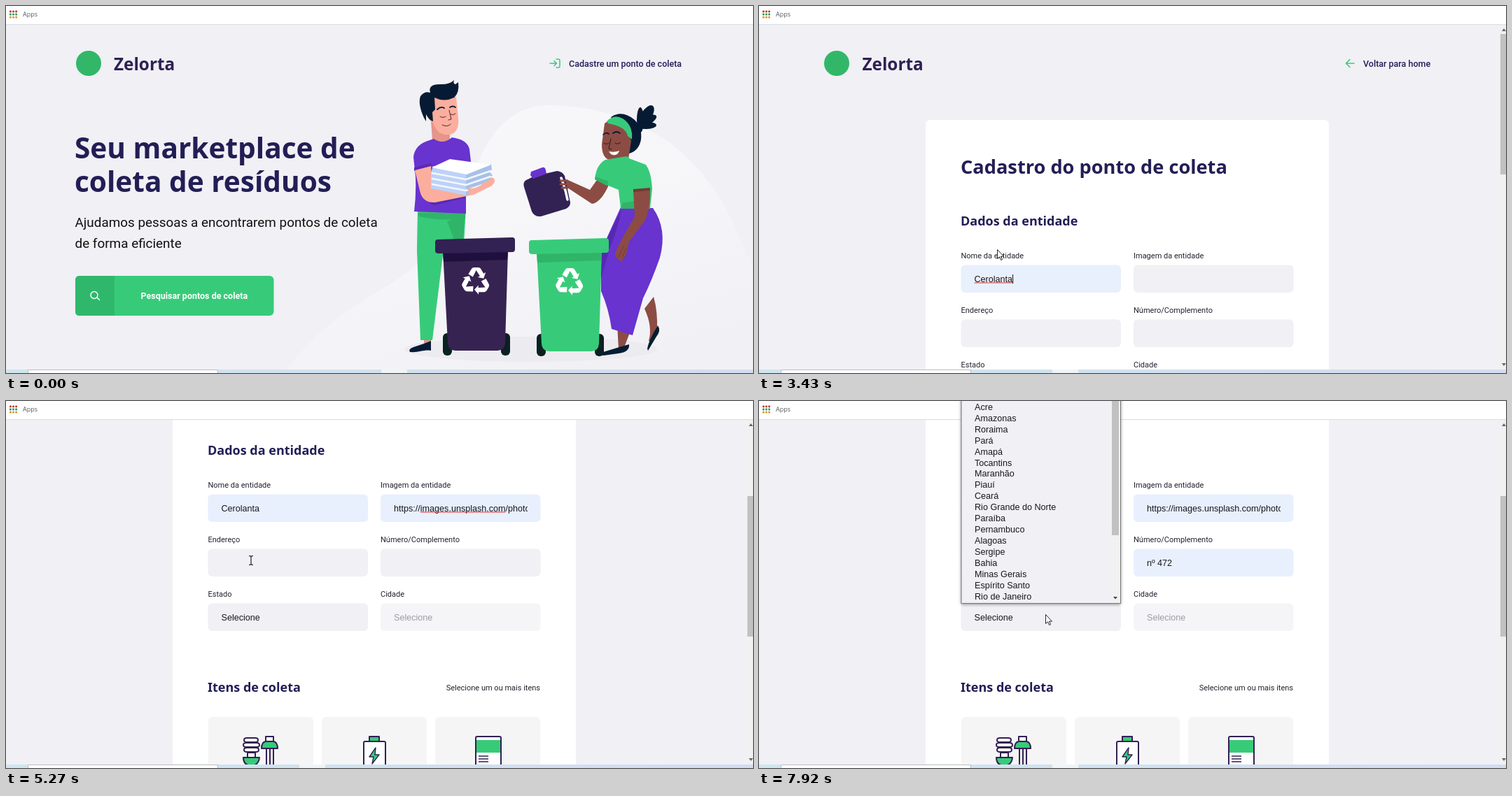
Animation, 1067 px wide and 525 px high, one loop 7.99 s. Source, as an HTML page:

```html
<!DOCTYPE html>
<html lang="pt-BR">
<head>
<meta charset="utf-8">
<title>Ponto de coleta</title>
<style>
html, body { margin: 0; width: 100%; height: 100%; overflow: hidden; background: #f0f0f5; }
svg { display: block; width: 1067px; height: 525px; font: 11px Roboto, sans-serif; fill: #24222f; }
.title { font-family: "Noto Sans", sans-serif; font-weight: 700; fill: #221e55; }
.brand { font-size: 24.3px; fill: #2f2152; }
.link { font-size: 12.5px; font-weight: 500; fill: #221e55; }
.input { font: 12.6px "Liberation Sans", Arial, sans-serif; fill: #17171c; }
.ui { font: 10.1px "Open Sans", sans-serif; fill: #111; }
.small { font-size: 9px; fill: #555a60; }
.muted { fill: #9b9ba6; }
.popup { filter: drop-shadow(0 1px 2px rgba(0, 0, 0, .4)); }
.line { fill: none; stroke-linecap: round; stroke-linejoin: round; }
</style>
</head>
<body>
<svg viewBox="0 0 1067 525">
  <defs>
    <clipPath id="view"><path d="M0 27H1067V520H0Z"/></clipPath>
    <clipPath id="urlBox"><path d="M554 371H745V410H554Z"/></clipPath>
    <linearGradient id="mist" x1=".3" y1="0" x2=".8" y2="1">
      <stop offset="0" stop-color="#f8f8fb"/><stop offset=".45" stop-color="#f6f6f9"/><stop offset="1" stop-color="#f0f0f5"/>
    </linearGradient>
    <linearGradient id="strip"><stop offset="0" stop-color="#cfe6ef"/><stop offset="1" stop-color="#d3dcf0"/></linearGradient>
    <path id="arm" d="M-9-9-5-15.5Q-4-17-2-17H3Q5-17 6-15.5L9.5-9.5 12-11 9.5-3.5 2.5-5 5-6.5 .5-13.5-3.5-5.5Z"/>
    <g id="recycle" fill="#fff"><use href="#arm"/><use href="#arm" transform="rotate(120)"/><use href="#arm" transform="rotate(240)"/></g>
  </defs>
  <rect width="1067" height="525" fill="#f0f0f5"/>

  <g clip-path="url(#view)">
    <g id="home">
      <path fill="url(#mist)" d="M399 522C435 472 485 436 535 406C600 370 640 320 665 250C686 180 724 142 775 142C850 143 905 165 950 197C1005 238 1032 295 1050 336L1069 378V522Z"/>
      <ellipse cx="750" cy="491" rx="181" ry="18" fill="#ebebf0"/>
      <circle cx="118" cy="82" r="18" fill="#32b768"/>
      <text class="title brand" x="154" y="91.5">Zelorta</text>
      <path class="line" stroke="#37cb79" stroke-width="1.5" d="M786 76h3q2 0 2 2v8q0 2-2 2h-3M777 82h9M783 78.500l3.500 3.500-3.500 3.500"/>
      <text class="link" x="804" y="86.5">Cadastre um ponto de coleta</text>
      <g class="title" font-size="40.6"><text x="98" y="218">Seu marketplace de</text><text x="98" y="266">coleta de resíduos</text></g>
      <g font-size="18.9" fill="#111"><text x="98.500" y="316">Ajudamos pessoas a encontrarem pontos de coleta</text><text x="98.500" y="346">de forma eficiente</text></g>
      <rect x="99" y="386" width="283.500" height="57" rx="6" fill="#37cb79"/>
      <path fill="#2fb86c" d="M155 386V443H105Q99 443 99 437V392Q99 386 105 386Z"/>
      <path class="line" stroke="#fff" stroke-width="1.4" d="M121 413.500a5 5 0 1 0 10 0a5 5 0 1 0-10 0M130 417l3.500 3.500"/>
      <text x="192.500" y="418.700" font-size="12.5" font-weight="700" fill="#fff">Pesquisar pontos de coleta</text>

      <!-- man -->
      <path fill="#e5958a" d="M597 472H607V483H597ZM607 165L634 170V192Q622 201 609 192Z"/>
      <path fill="#071c33" d="M607 479V493C598 491 590 496 577 495Q574 491 582 488L597 483Z"/>
      <path fill="#37cb79" d="M588 290H657L654 340H626L609 478H592L587 350Z"/>
      <path fill="#2fb468" d="M589 296H656V304Q620 308 589 301ZM630 308L655 300 653 334H640Z"/>
      <path fill="#6833cf" d="M582 216Q584 198 605 192L611 190Q624 199 637 188Q659 191 662 205L664 222 657 245V297L583 294Q586 270 585 245Z"/>
      <path fill="#5729b2" d="M604 282L657 268V274L612 285ZM583 231L607 225 608 229 583 236Z"/>
      <path fill="#fbae9d" d="M604 132Q625 122 643 130L646 160Q648 181 634 184Q616 186 610 167Q602 164 603 153Z"/>
      <path fill="#061b33" d="M600 165L597 160Q588 140 592 129Q598 121 606 124Q602 111 622 112Q634 112 640 106Q638 111 642 112L646 109Q648 124 640 131Q626 138 612 131L613 148 609 152 610 165Q604 163 600 155Z"/>
      <path class="line" stroke="#4a2630" d="M620 158q4 3 8 0M635 155q4 2 7-1M633 149l3 13-4 1M623 170q7 4 12-1"/>
      <path class="line" stroke="#061b33" stroke-width="1.8" d="M616 148q5-5 10-2M634 145q4-3 8 0"/>
      <path fill="#fbae9d" d="M584 235L607 229 609 255Q625 258 672 260L688 247Q697 243 698 250Q697 257 688 260L668 270 613 281Q597 282 592 268Z"/>
      <path fill="#bdd2f7" d="M607 238L610 229 658 240V271L607 261Z"/>
      <path fill="#a8c0e8" d="M657 241L693 226 694 234 691 238 695 242 691 247 694 251 657 271Z"/>
      <path fill="#fff" d="M608 231L634 219 693 227 658 241Z"/>
      <path class="line" stroke="#f3f7ff" stroke-width="2.500" d="M609 239L657 248 692 236M609 247L657 256 692 244M609 255L657 264 692 252"/>
      <path fill="#fbae9d" d="M659 261Q674 262 682 253L696 246Q701 251 691 257Q678 267 662 269Z"/>

      <!-- woman -->
      <path fill="#8c4c44" d="M873 455L893 462 882 491H875ZM912 433L925 416Q931 436 930 464L922 482 918 479Q924 459 912 433Z"/>
      <path fill="#071c33" d="M876 488L890 484Q891 495 875 497L853 500Q849 498 853 495ZM916 490Q918 478 931 457Q936 464 929 473L917 493Z"/>
      <path fill="#6833cf" d="M878 288L924 289Q945 319 934 360Q922 394 910 418L895 471 865 462Q861 433 850 408V350Z"/>
      <path fill="#5729b2" d="M879 291Q873 322 862 347L850 390V350Z"/>
      <path fill="#8c4c44" d="M846 246L861 256Q850 281 837 283L802 260Q793 262 792 252Q796 245 805 250L834 263Z"/>
      <path fill="#061b33" d="M864 159Q880 148 898 163Q909 174 907 191Q904 209 886 212L878 180Z"/>
      <g fill="#061b33"><ellipse cx="906" cy="163" rx="5" ry="18"/><ellipse cx="914" cy="158" rx="8" ry="18" transform="rotate(32 914 158)"/><ellipse cx="915" cy="165" rx="6" ry="16" transform="rotate(60 915 165)"/><ellipse cx="915" cy="171" rx="5" ry="14" transform="rotate(88 915 171)"/></g>
      <path fill="#8c4c44" d="M855 168Q868 158 882 168L893 193 889 219Q874 224 861 220Q851 216 851 198Z"/>
      <path fill="#37cb79" d="M858 165Q868 154 881 161Q896 171 894 191L888 186Q885 172 860 168Z"/>
      <path class="line" stroke="#2c1822" d="M854 196q4 3 7 0M870 196q4 3 8-1M864 190l-3 14 4 1"/>
      <path class="line" stroke="#061b33" stroke-width="1.7" d="M853 184q4-4 8-1M867 182q5-4 10 0"/>
      <path fill="#fff" d="M861 208Q869 210 876 207Q873 216 864 212Z"/>
      <path fill="#37cb79" d="M856 220L880 216Q891 214 890 218L914 227Q922 238 923 262L920 290H878L875 263 858 256 841 248Q843 227 856 220Z"/>
      <path fill="#2fb468" d="M881 281Q902 281 918 266L920 290H878ZM842 244L861 251 858 257 841 248Z"/>
      <path fill="#8c4c44" d="M896 264L920 262Q921 291 912 308L890 337 886 355 879 366 871 359 870 353 881 331 898 301Z"/>
      <path fill="#733a36" d="M896 262L920 260V264L896 266Z"/>
      <path class="line" stroke="#733a36" d="M882 344l-7 15M886 346l-6 14"/>

      <!-- jug -->
      <path fill="#322153" d="M743 249Q751 245 756 243L787 236Q795 237 798 243L806 281Q806 287 800 290L764 301Q755 302 751 294L740 259Q738 252 743 249Z"/>
      <path fill="#6833cf" d="M750 237L766 231Q770 230 771 235L772 240 753 247 749 242Z"/>
      <path class="line" stroke="#fff" stroke-width="3.500" d="M793 246Q799 261 802 277"/>
      <path class="line" stroke="#8c4c44" stroke-width="3" d="M792 250h10M792 255h10M794 260h8"/>

      <!-- bins -->
      <g id="bin">
        <rect x="624" y="468" width="13" height="32" rx="6" fill="#0b2022"/><rect x="707" y="468" width="13" height="32" rx="6" fill="#0b2022"/>
        <path class="body" fill="#372352" d="M624 350H717L713 482Q712 493 702 493H643Q632 493 631 482Z"/>
        <path class="shade" fill="#1f0f3e" d="M624 352H717L716 363 625 366Z"/>
        <path class="body" fill="#322153" d="M617 334L723 331Q727 331 727 335V348Q727 352 723 352L618 354Q613 354 613 350V338Q613 334 617 334Z"/>
        <use href="#recycle" transform="translate(671 394) scale(1.18)"/>
      </g>
    </g>

    <g id="form">
      <g id="page">
        <circle cx="111" cy="82" r="18" fill="#32b768"/>
        <text class="title brand" x="147.500" y="91.5">Zelorta</text>
        <path class="line" stroke="#37cb79" stroke-width="1.600" d="M850 82H838.500M844 76.500L838.500 82 844 87.500"/>
        <text class="link" x="863" y="87">Voltar para home</text>
        <rect x="238" y="163" width="576" height="900" rx="6" fill="#fff"/>
        <g class="title"><text x="288" y="240" font-size="27.2">Cadastro do ponto de coleta</text><text x="288" y="314" font-size="18">Dados da entidade</text><text x="288" y="653" font-size="18">Itens de coleta</text></g>
        <text x="763" y="651" text-anchor="end">Selecione um ou mais itens</text>
        <g id="fields"></g>
        <rect id="mark" height="1" fill="#d33"/>
        <rect id="caret" width="1" height="13" fill="#111"/>
        <g fill="#f5f5f6"><rect x="289" y="689" width="150" height="150" rx="6"/><rect x="451" y="689" width="150" height="150" rx="6"/><rect x="613" y="689" width="150" height="150" rx="6"/></g>
        <g transform="translate(0 237)" stroke="#322153" stroke-width="2" stroke-linejoin="round">
          <path fill="#fff" d="M344 482h12q4 0 4 3t-4 3h-12q-4 0-4-3t4-3ZM343 489h15q4 0 4 3t-4 3h-15q-4 0-4-3t4-3ZM344 496h13q4 0 4 3t-4 3h-13q-4 0-4-3t4-3ZM345 503h11v7h-11Z"/>
          <path fill="#37cb79" d="M339 510H362Q361 521 350 522Q339 521 339 510ZM365 497Q365 488 371 487H382Q388 488 388 497Z"/>
          <path fill="#fff" d="M371 480H382V487H371ZM372 497V525M377 497V525M382 497V525"/>
          <path fill="#37cb79" d="M519 480H533V487H519Z"/>
          <rect x="511" y="487" width="31" height="50" rx="2" fill="#fff"/>
          <path fill="#37cb79" stroke-width="1.400" d="M528 496L519 509H525L523 519 533 506H527Z"/>
          <rect x="671" y="480" width="36" height="52" rx="2" fill="#fff"/>
          <path stroke="none" fill="#37cb79" d="M672 485H706V503H672Z"/>
          <path stroke-width="1.600" d="M675 508H689M675 512H689M675 516H689"/>
        </g>
      </g>
      <path fill="#f1f1f1" d="M1059 27H1067V520H1059Z"/>
      <rect id="thumb" x="1059" width="8" height="201" fill="#c1c1c1"/>
      <path fill="#666" d="M1061 36L1064 32 1067 36ZM1061 511L1064 515 1067 511Z"/>
      <g id="popups"></g>
    </g>
    <g id="status"><path fill="#dee1e6" stroke="#cfd2d7" d="M-1 503.500H115Q118 503.500 118 507V521H-1Z"/><text class="ui small" x="113" y="515" text-anchor="end">localhost:3000/create-point</text></g>
  </g>

  <path fill="#fff" d="M0 0H1067V26H0Z"/><path fill="#dadce0" d="M0 26H1067V27H0Z"/>
  <g id="apps"></g>
  <text class="ui small" x="24" y="15.300">Apps</text>
  <path fill="url(#strip)" d="M0 520H1067V525H0Z"/>
  <path fill="#fff" stroke="#b9bec4" d="M31.500 526V520.500H302.500V526Z"/>
  <rect id="gap" y="520" width="37" height="5" fill="#f0f4f6"/>

  <g id="list" class="popup"></g>
  <g id="cursor" stroke-linejoin="round">
    <path id="arrow" fill="#fff" stroke="#111" stroke-width=".9" d="M.5.500V13.500L3.500 10.800 5.600 15.500 7.600 14.600 5.500 10.200H9.500Z"/>
    <path id="beam" fill="none" stroke="#222" stroke-width="1.200" d="M-3-6.500Q0-6.500 0-5V5Q0 6.500 3 6.500M3-6.500Q0-6.500 0-5M0 5Q0 6.500-3 6.500"/>
    <path id="hand" fill="#fff" stroke="#111" stroke-width=".9" d="M-1.500 1Q0-1 1.500 1V6L9 8Q10 9 9.500 12L8 17H0L-5 10Q-5 7-1.500 10Z"/>
  </g>
</svg>
<script>
const LOOP = 7990, OPEN_FORM = 930, OPEN_LIST = 7520, BLINK = 530, ROW = 28.5;
const $ = id => document.getElementById(id);
const make = (parent, tag, attrs, text) => {
  const el = document.createElementNS('http://www.w3.org/2000/svg', tag);
  set(el, attrs);
  if (text) el.textContent = text;
  return parent.appendChild(el);
};
const set = (el, attrs) => { for (const k in attrs) el.setAttribute(k, attrs[k]); };
const show = (el, on) => el.style.display = on ? '' : 'none';
const move = (el, x, y) => el.setAttribute('transform', `translate(${x} ${y})`);
const part = (t, from, to) => Math.min(1, Math.max(0, (t - from) / (to - from)));
const smooth = k => k * k * (3 - 2 * k);
const inside = ([px, py], x, y, w, h) => px >= x && px < x + w && py >= y && py < y + h;

// Wheel scroll that starts fast and settles
const scrollAt = t => Math.round(237 * (1 - (1 - part(t, 4640, 5090)) ** 2.15));

// Pointer stops: leave, arrive, x, y
const stops = [
  [70, 370, 880, 63], [370, 520, 848, 96], [600, 690, 846, 87], [1000, 1300, 518, 162], [1300, 1860, 345, 387],
  [3120, 3240, 340, 348], [3450, 3690, 600, 391], [3970, 4050, 590, 429], [4230, 4580, 442, 378], [4750, 5200, 350, 228],
  [5720, 5960, 345, 295], [6160, 6420, 530, 236], [6500, 6580, 600, 232], [6920, 7010, 590, 270], [7170, 7450, 424, 311],
  [7840, 7920, 409, 305]
];
const pointerAt = t => stops.reduce(([px, py], [leave, arrive, x, y]) => {
  const k = smooth(part(t, leave, arrive));
  return [px + (x - px) * k, py + (y - py) * k];
}, [932, 300]);

// Green copy of the bin
const bin = $('bin'), green = bin.cloneNode(true);
green.removeAttribute('id');
move(green, 134, 1);
green.querySelectorAll('.body').forEach(p => set(p, { fill: '#37cb79' }));
set(green.querySelector('.shade'), { fill: '#2fb468' });
bin.after(green);

const dots = ['#c0392f', '#2f9e57', '#d9952b'];
for (let i = 0; i < 9; i++)
  make($('apps'), 'rect', { x: 5 + i % 3 * 4.1, y: 6.5 + (i / 3 | 0) * 4.1, width: 2.8, height: 2.8, rx: .8, fill: dots[i / 3 | 0] });

function addPopup(f) {
  const g = make($('popups'), 'g', { class: 'popup' });
  const h = f.items.length * ROW + 12.5, below = f.y + 40 - scrollAt(f.open);
  const x = f.x - .5, y = below + h > 520 ? f.y - h : below;
  const back = make(g, 'rect', { x, y, height: h, fill: '#fff' });
  const bar = make(g, 'rect', { x, height: ROW, fill: '#c8c8c8' });
  const lengths = f.items.map((s, i) =>
    make(g, 'text', { x: x + 9, y: y + 24.5 + i * ROW, class: 'ui' }, s).getComputedTextLength());
  const w = Math.min(360, Math.max(229, ...lengths.map(n => n + 18)));
  set(back, { width: w });
  set(bar, { width: w });
  return { g, bar, x, y, w, h };
}

// Each field: label, value, focus time, choice time, suggestions, misspelt word
const photo = n => `https://images.unsplash.com/photo-${n}?ixlib=rb-1.2.1&auto=format`;
const fields = [
  ['Nome da entidade', 'Cerolanta', 2030, 3350, ['Coleta teste', 'Teste', 'Ponto um', 'Ponto dois', 'Cerolanta'], 'Cerolanta'],
  ['Imagem da entidade', photo(1503596476), 3770, 4200, [photo(1503596476), photo(1528323273)], 'images.unsplash.com'],
  ['Endereço', 'TZB quinta 4 setor M', 5680, 6130, ['Rua Lorbe', 'TZB quinta 4 setor M'], 'TZB'],
  ['Número/Complemento', 'nº 472', 6660, 7150, ['nº 472']],
  ['Estado', 'Selecione', OPEN_LIST],
  ['Cidade', 'Selecione', Infinity]
].map(([label, value, open, pick = 0, items, odd], i) => {
  const x = i % 2 ? 535 : 288.5, y = 371 + (i >> 1) * 78, g = $('fields');
  const off = open === Infinity, clip = i === 1 ? { 'clip-path': 'url(#urlBox)' } : {};
  make(g, 'text', { x, y: y - 10 }, label);
  const box = make(g, 'rect', { x, y: y - .5, width: 228.5, height: 39.5, rx: 6, fill: off ? '#f5f5f7' : '#f0f0f5' });
  const text = make(g, 'text', { x: x + 19, y: y + 23.5, class: off ? 'input muted' : 'input', ...clip }, value);
  const hint = make(g, 'text', { x: x + 19, y: y + 23, class: 'ui', ...clip });
  const f = { x, y, value, open, pick, items, odd, box, text, hint };
  if (items) f.popup = addPopup(f);
  return f;
});
const inputs = fields.filter(f => f.items);

const list = $('list');
make(list, 'rect', { x: 289, y: -3, width: 227.5, height: 292.5, fill: '#f0f0f5', stroke: '#767676' });
make(list, 'path', { d: 'M503 0H516V289H503Z', fill: '#f1f1f1' });
make(list, 'path', { d: 'M504 0H514V192H504Z', fill: '#c1c1c1' });
make(list, 'path', { d: 'M506 280L509 283.500 512 280Z', fill: '#444' });
('Acre,Amazonas,Roraima,Pará,Amapá,Tocantins,Maranhão,Piauí,Ceará,Rio Grande do Norte,Paraíba,Pernambuco,' +
 'Alagoas,Sergipe,Bahia,Minas Gerais,Espírito Santo,Rio de Janeiro').split(',')
  .forEach((s, i) => make(list, 'text', { x: 308, y: 12.7 + i * 15.96, class: 'input' }, s));

function drawInput(f, t, pointer) {
  const { g, bar, x, y, w, h } = f.popup;
  const picked = t >= f.pick, open = t >= f.open && !picked;
  const over = open && inside(pointer, x, y, w, h);
  const row = over ? Math.min(f.items.length - 1, Math.max(0, Math.floor((pointer[1] - y - 6.5) / ROW))) : 0;
  show(g, open);
  show(bar, over);
  set(bar, { y: y + 6.5 + row * ROW });
  set(f.box, { fill: over || picked ? '#e8f0fe' : '#f0f0f5' });
  f.hint.textContent = over ? f.items[row] : '';
  show(f.text, picked);
  return over;
}

function drawFocus(t) {
  const f = fields.findLast(f => t >= f.open), typing = f && f.items;
  const done = typing && t >= f.pick, marked = done && f.odd;
  show($('mark'), marked);
  if (marked) {
    const from = f.value.indexOf(f.odd);
    set($('mark'), { x: f.text.getStartPositionOfChar(from).x, y: f.y + 24.5, width: f.text.getSubStringLength(from, f.odd.length) });
  }
  const end = done ? f.text.getComputedTextLength() : 0;
  show($('caret'), typing && end < 190 && (t - f.open) % (2 * BLINK) < BLINK);
  if (typing) move($('caret'), f.x + 19 + end, f.y + 13);
}

function draw(t) {
  const home = t < OPEN_FORM, scroll = scrollAt(t), pointer = pointerAt(t);
  show($('home'), home);
  show($('form'), !home);
  show($('status'), t >= 850 && t < 1560);
  set($('gap'), { x: home ? 536 : 419 });
  move($('page'), 0, -scroll);
  set($('thumb'), { y: 40 + scroll * .405 });

  const overPopup = inputs.map(f => drawInput(f, t, pointer)).includes(true);
  drawFocus(t);
  show(list, t >= OPEN_LIST);

  const overLink = home && inside(pointer, 777, 74, 189, 16);
  const overInput = !home && !overPopup && inputs.some(f => inside(pointer, f.x, f.y - scroll, 228, 39));
  const kind = overLink ? 'hand' : overInput ? 'beam' : 'arrow';
  ['arrow', 'beam', 'hand'].forEach(k => show($(k), k === kind));
  show($('cursor'), t >= 70);
  move($('cursor'), ...pointer);
}

const start = performance.now();
const tick = () => {
  draw((performance.now() - start) % LOOP);
  requestAnimationFrame(tick);
};
tick();
</script>
</body>
</html>
```
